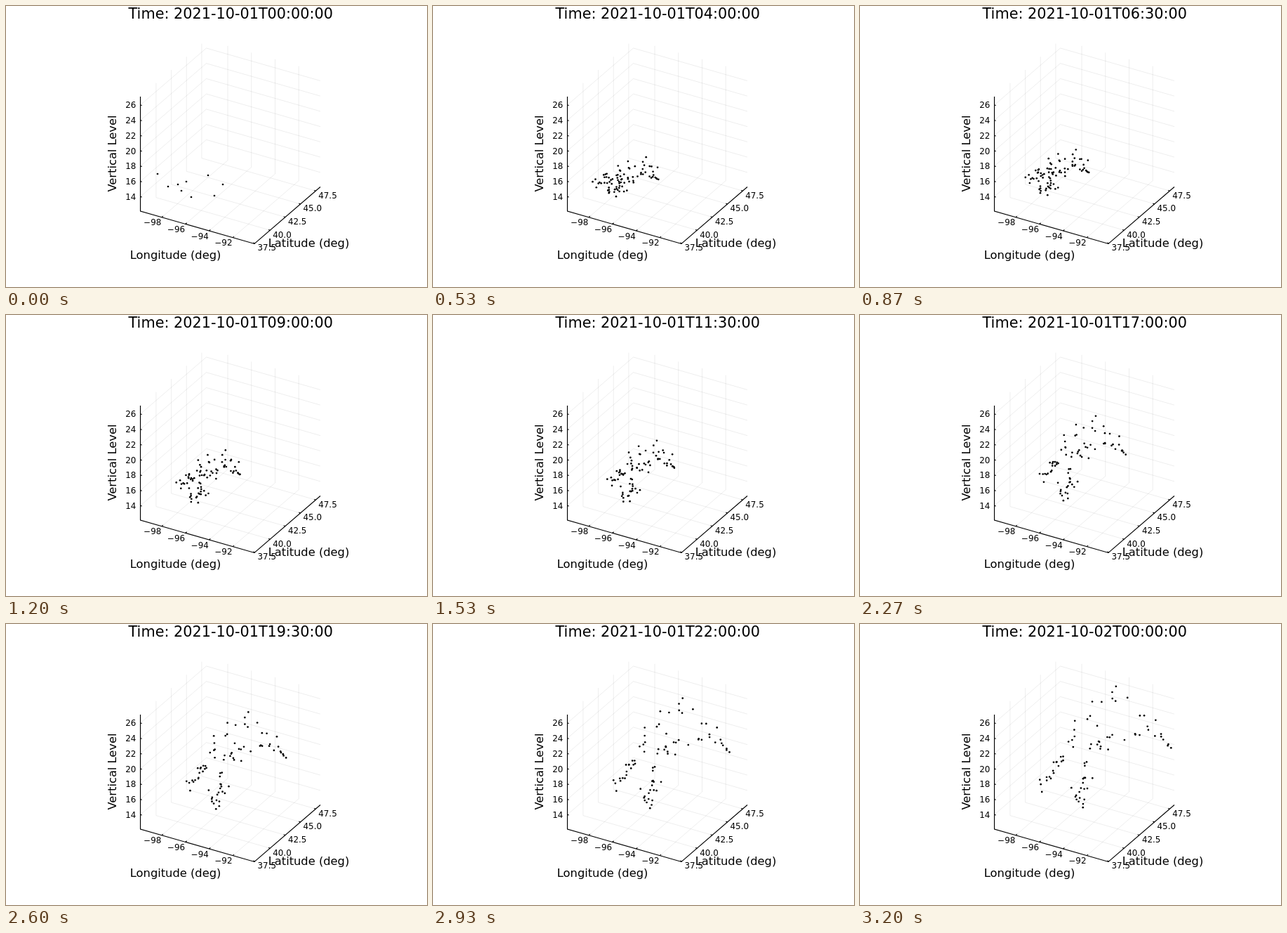
Recreate the animation shown at these times as an HTML page. Size 600x400 px, loop 3270 ms.

```html
<!DOCTYPE html>
<html>
<head>
<meta charset="utf-8">
<style>
html, body { margin: 0; width: 100%; height: 100%; overflow: hidden; background: #fff; }
svg { display: block; font: 11.9px "DejaVu Sans", sans-serif; }
.title { font-size: 20.8px; }
.name { font-size: 16.3px; }
.mid { text-anchor: middle; }
.end { text-anchor: end; }
.grid { stroke: #000; stroke-opacity: .1; stroke-width: .7; fill: none; }
.axis { stroke: #000; stroke-width: 1.1; fill: none; }
</style>
</head>
<body>
<svg id="plot" width="600" height="400" viewBox="0 0 600 400"></svg>
<script>
const plot = document.getElementById('plot');

function add(tag, attrs, text = '') {
  const el = document.createElementNS('http://www.w3.org/2000/svg', tag);
  for (const key in attrs) el.setAttribute(key, attrs[key]);
  el.textContent = text;
  plot.append(el);
  return el;
}
const line = (cls, ...pts) => add('polyline', { class: cls, points: pts.join(' ') });
const label = (cls, x, y, text, more) => add('text', { class: cls, x, y, ...more }, text);

// Box coordinates 0..1 (longitude, latitude, level) to the screen
const project = (a, b, c) => [191.5 + 162.5 * a + 94 * b, 292 + 46.5 * a - 81 * b - 163 * c];

for (let i = 0; i < 4; i++) {
  const a = .188 + .2075 * i, [x, y] = project(a, 0, 0);
  line('grid', [x, y], project(a, 1, 0), project(a, 1, 1));
  line('axis', [x, y], [x + 1.9, y - 1.6]);
  label('end', x - .7, y + 11.6, '\u2212' + (98 - 2 * i));
}
for (let i = 0; i < 5; i++) {
  const b = .008 + .2305 * i, [x, y] = project(1, b, 0);
  line('grid', [x, y], project(0, b, 0), project(0, b, 1));
  line('axis', [x, y], [x - 2.4, y - .7]);
  label('', x + 3.8, y + 10.5, (37.5 + 2.5 * i).toFixed(1));
}
for (let i = 0; i < 7; i++) {
  const c = (1.9 + 2 * i) / 15, [x, y] = project(0, 0, c);
  line('grid', [x, y], project(0, 1, c), project(1, 1, c));
  line('axis', [x, y], [x + 2.2, y + .6]);
  label('end', 185.3, y + 4.4, 14 + 2 * i);
}
line('axis', project(0, 0, 1), project(0, 0, 0), project(1, 0, 0), project(1, 1, 0));
label('name mid', 241.6, 360, 'Longitude (deg)');
label('name mid', 431.5, 343.3, 'Latitude (deg)');
label('name mid', 0, 0, 'Vertical Level', { transform: 'translate(157 210) rotate(-90)' });
const title = label('title mid', 320.3, 18);

// The cloud hangs on a bent ribbon, given by a few points in three poses
const early = 8, middle = 27, late = 48;
const ribbon = [
  [[248, 267], [275, 266], [315, 262]],
  [[262, 258], [286, 246], [312, 236]],
  [[268, 250], [292, 230], [325, 198]],
  [[278, 248], [309, 201], [355, 158]],
  [[314, 244], [350, 209], [440, 175]],
  [[302, 225], [323, 176], [365, 95]],
  [[264, 243], [283, 205], [300, 166]],
  [[246, 245], [268, 222], [279, 200]],
  [[228, 250], [255, 234], [252, 240]]
];

// Nine release sites, in ribbon order
const sites = [[264, 272], [250, 263], [257, 250], [297, 270], [309, 254],
  [288, 241], [245, 254], [231, 257], [216, 239]];

let seed = 7;
function random() {
  seed = (seed * 16807) % 2147483647;
  return seed / 2147483647;
}
const scatter = () => (random() + random() - 1) * 13;
const mix = (p, q, u) => p.map((v, axis) => v + (q[axis] - v) * u);

// Parabola in time through the three poses
function drift([p, q, r], k) {
  const basis = (at, b, c) => (k - b) * (k - c) / ((at - b) * (at - c));
  const wp = basis(early, middle, late);
  const wq = basis(middle, early, late);
  const wr = basis(late, early, middle);
  return p.map((v, axis) => v * wp + q[axis] * wq + r[axis] * wr);
}

function flow(s, k) {
  const at = s * (ribbon.length - 1), i = Math.floor(at);
  return mix(drift(ribbon[i], k), drift(ribbon[i + 1], k), at - i);
}

// Every site releases one dot per step until the early pose
const dots = [];
for (let born = 0; born <= early; born++) {
  sites.forEach((site, i) => dots.push({
    born, site,
    s: (i + random()) / sites.length,
    shift: [scatter(), scatter()],
    el: add('circle', { r: 1.35 })
  }));
}

function place({ site, s, shift }, k) {
  const spread = Math.min(1, k / early);
  return mix(site, flow(s, k), spread).map((v, axis) => v + shift[axis] * spread);
}

const loop = 3270, steps = 49;
let shown = -1;

function draw(now) {
  const k = Math.min(steps - 1, Math.floor((now % loop + 5) * .015));
  if (k === shown) return;
  shown = k;
  const date = new Date(Date.UTC(2021, 9, 1, 0, 30 * k));
  title.textContent = 'Time: ' + date.toISOString().slice(0, 19);
  for (const dot of dots) {
    const [x, y] = place(dot, k);
    dot.el.setAttribute('cx', x);
    dot.el.setAttribute('cy', y);
    dot.el.setAttribute('visibility', k < dot.born ? 'hidden' : 'visible');
  }
}

const begin = performance.now();
function tick() {
  draw(performance.now() - begin);
  requestAnimationFrame(tick);
}
tick();
</script>
</body>
</html>
```
